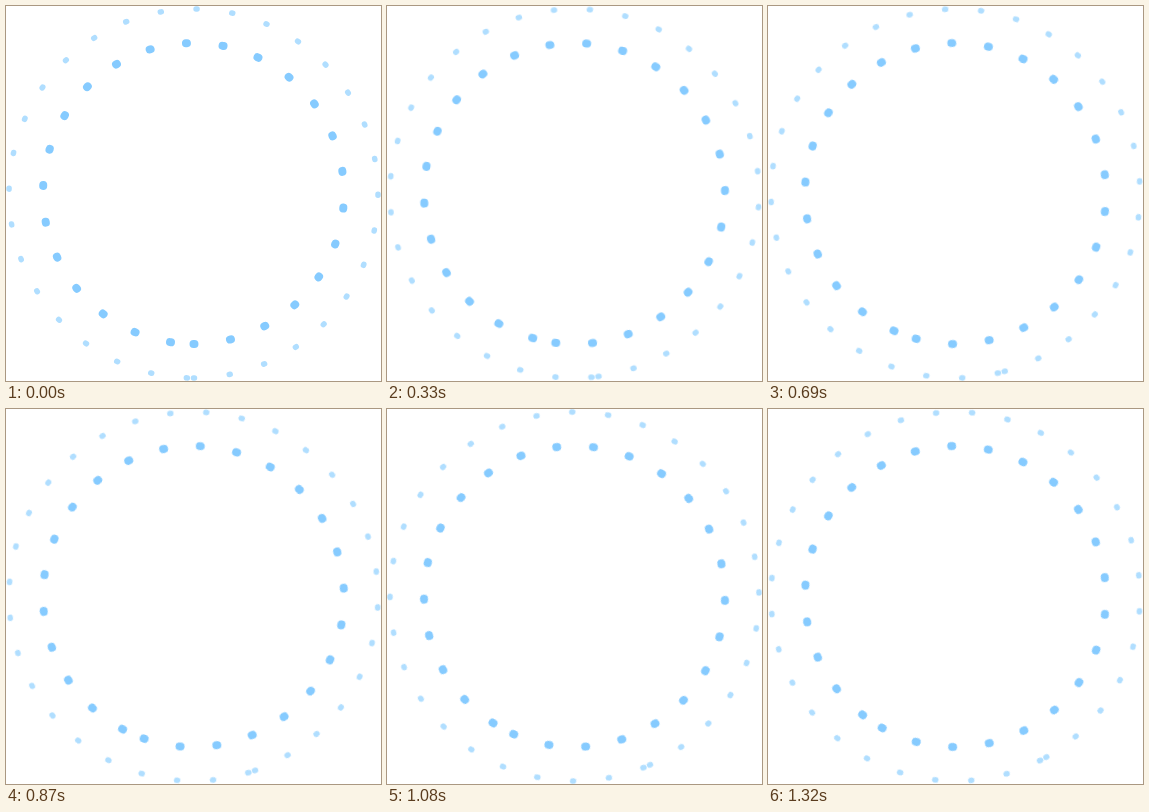
An HTML page without scripts for the animation above (1350 ms loop, 375 px wide and 375 px high).

```html
<!DOCTYPE html>
<html lang="en">
<head>
<meta charset="utf-8">
<title>Counter-rotating dotted rings</title>
<style>
  html, body { margin: 0; width: 100%; height: 100%; overflow: hidden; background: #fff; }
  svg { display: block; width: 100%; height: 100%; }
  .ring {
    fill: none;
    stroke-linecap: round;
    transform-origin: 187.5px 187.5px;
    animation: spin 1.35s steps(45) infinite;
  }
  /* Path length is 360, so dashes are measured in degrees. */
  .inner { --turn: 30deg; stroke: #86cbff; stroke-width: 8; stroke-dasharray: .38 13.66; }
  .outer { --turn: -30deg; stroke: #b0deff; stroke-width: 5.5; stroke-dasharray: .31 10.87; }
  @keyframes spin { to { transform: rotate(var(--turn)); } }
</style>
</head>
<body>
<svg viewBox="0 0 375 375">
  <!-- Both rings start at the bottom and run counter-clockwise. -->
  <path class="ring outer" pathLength="360" d="M187.5 372a184.5 184.5 0 0 0 0-369a184.5 184.5 0 0 0 0 369"/>
  <path class="ring inner" pathLength="360" d="M187.5 338a150.5 150.5 0 0 0 0-301a150.5 150.5 0 0 0 0 301"/>
</svg>
</body>
</html>
```
